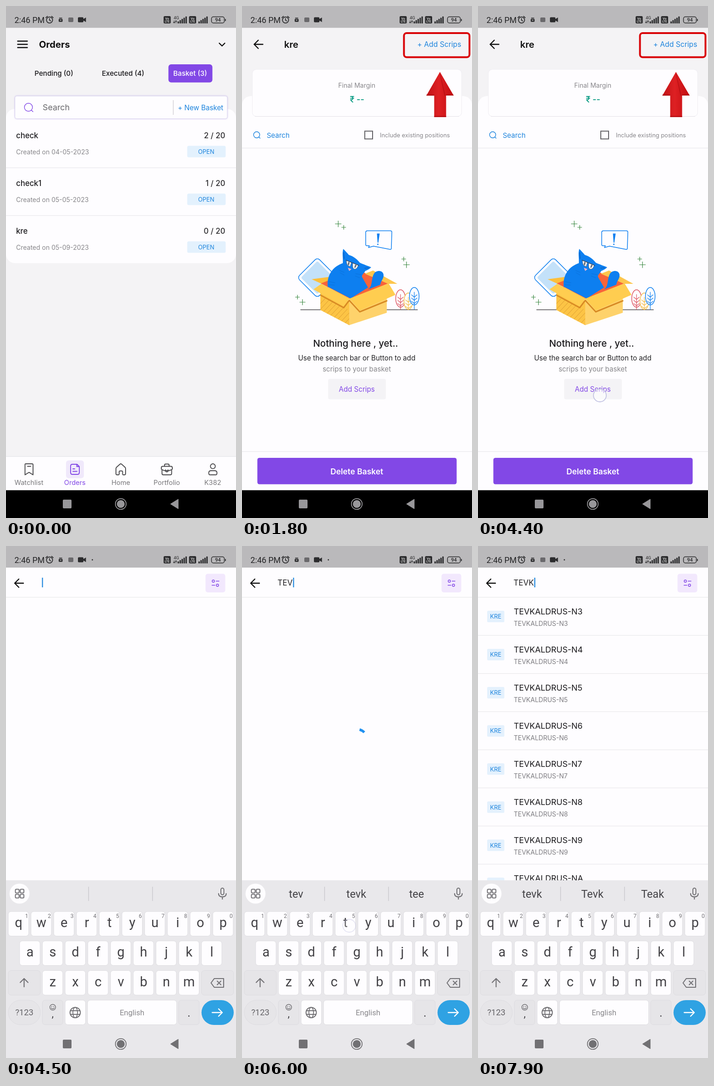
Write an HTML page that moves like this. It is 502 px wide and 1115 px high and loops after 8000 ms.

```html
<!DOCTYPE html>
<html lang="en">
<head>
<meta charset="utf-8">
<title>Add scrips to a basket</title>
<style>
  html, body { margin: 0; width: 100%; height: 100%; overflow: hidden; background: #f4f3f5; }
  svg { display: block; width: 502px; height: 1115px; }
  text { font-family: Inter, Roboto, sans-serif; white-space: pre; }
  .rb { font-family: Roboto, "Open Sans", sans-serif; }
  .ln { fill: none; stroke-linecap: round; stroke-linejoin: round; }
</style>
</head>
<body>
<svg id="stage" viewBox="0 0 502 1115"></svg>
<script>
const PURPLE = '#8248e6', BLUE = '#1d84dd', GREY = '#87868a', PANEL = '#fefdff', BACK = '#f4f3f5';

const rect = (x, y, w, h, fill, r = 0, more = '') =>
  `<rect x="${x}" y="${y}" width="${w}" height="${h}" rx="${r}" fill="${fill}" ${more}/>`;
const line = (d, stroke, w = 1.5, more = '') =>
  `<path class="ln" d="${d}" stroke="${stroke}" stroke-width="${w}" ${more}/>`;
const shape = (d, fill, more = '') => `<path d="${d}" fill="${fill}" ${more}/>`;
const disc = (x, y, r, fill, more = '') => `<circle cx="${x}" cy="${y}" r="${r}" fill="${fill}" ${more}/>`;
const ring = (x, y, r, stroke, w) => disc(x, y, r, 'none', `stroke="${stroke}" stroke-width="${w}"`);
const text = (x, y, size, str, fill, more = '') =>
  `<text x="${x}" y="${y}" font-size="${size}" fill="${fill}" ${more}>${str}</text>`;
const MID = 'text-anchor="middle"', END = 'text-anchor="end"', MED = 'font-weight="500"';
const SEMI = 'font-weight="600"', RB = 'class="rb"';
const group = (id, body) => `<g id="${id}">${body}</g>`;
const rule = (y, color = '#e9e8eb') => rect(0, y, 502, 1.2, color);
const backArrow = (x, y) => line(`M${x + 19} ${y}H${x}m9-9l-9 9 9 9`, '#111', 2.4);
const lens = (x, y, r, color, w) => ring(x, y, r, color, w) +
  line(`M${x + r * .72} ${y + r * .72}l${r * .4} ${r * .4}`, color, w);

function statusBar() {
  const ink = '#2b2b2d';
  const volte = x => rect(x, 22, 15.5, 16, ink, 2.5) +
    text(x + 7.7, 29.5, 7, 'Vo', '#ccc', `${MID} class="rb" font-weight="700"`) +
    text(x + 7.7, 36, 6.5, 'LTE', '#ccc', `${MID} class="rb" font-weight="700"`);
  const bars = x => [0, 1, 2, 3, 4].map(i =>
    rect(x + i * 4.3, 33.5 - i * 2.7, 3, 4.5 + i * 2.7, ink, .8)).join('');
  return rect(0, 0, 502, 47.5, '#bab9bb') + text(18.5, 37, 17.9, '2:46 PM', '#242426', RB) +
    ring(95, 30.5, 6.7, ink, 1.8) + line('M95 27v4l2.5 1.5M87 25.5l3.5-3M103 25.5l-3.5-3', ink, 1.7) +
    rect(115, 28, 8.5, 6.5, ink, 1.5) + rect(116, 25.5, 6.5, 1.6, ink) + rect(117.5, 30, 3.5, 1.6, '#bbb') +
    rect(136, 25, 11, 10, '#6a696c', 2) +
    rect(157, 24.5, 12, 11, ink, 2) + shape('M168 29l6.5-4v10l-6.5-4z', ink) +
    volte(344) + text(366, 28.5, 9.5, '4G', ink, RB) +
    line('M367 32v5m-1.5-1.5l1.5 1.5 1.5-1.5M371 37v-5m-1.5 1.5l1.5-1.5 1.5 1.5', ink, 1.1) +
    bars(374.5) + volte(399.5) + bars(420) +
    rect(448.5, 23.5, 28, 13.5, 'none', 4, `stroke="${ink}" stroke-width="1.5"`) + rect(478, 28, 1.8, 5, ink, 1) +
    text(462.5, 34.3, 11, '94', ink, `${MID} class="rb" font-weight="500"`);
}

const navKeys = (back, ink) => rect(0, 1054.5, 502, 60.5, back) + rect(124, 1075, 19, 19, ink, 2) +
  ring(250.5, 1084.5, 11.7, ink, 1.8) + disc(250.5, 1084.5, 8.6, ink) +
  shape('M359 1084.5L376 1074v21z', ink, `stroke="${ink}" stroke-linejoin="round"`);

function ordersPage() {
  const row = ([name, date, n], i) => {
    const y = 104 * i;
    return text(22, 288 + y, 16.7, name, '#1c1b1e', MED) + text(478.5, 288 + y, 16.7, n + ' / 20', '#2c2b2e', `${END} ${MED}`) +
      text(22, 322.5 + y, 14, 'Created on ' + date, GREY) + rect(395.5, 304.5 + y, 84, 25, '#e3f1fd', 3.5) +
      text(437, 322 + y, 12.9, 'OPEN', BLUE, MID) + (i < 2 ? rule(351.7 + y) : '');
  };
  const ink = '#4a494c';
  const icons = [
    'M41.5 998q0-1 1.5-1H57q2 0 2 2v22l-8.7-5.5-8.8 5.5zM47 1002.5h7',
    'M155 998h-10q-4 0-4 4v14q0 4 4 4h11q4 0 4-4v-13zM154.500 998v5h5.500M146 1008h4m-4 5.500h9',
    'M240 1007.500q0-2 1.500-3.300l7-6.200q2-1.800 4 0l7 6.200q1.500 1.300 1.500 3.300v11q0 2.500-2.500 2.500h-2.500q-1.500 0-1.500-1.500v-5q0-2-2-2h-3.500q-2 0-2 2v5q0 1.500-1.500 1.500h-3q-2.500 0-2.500-2.500z',
    'M342 1002.500h18q3 0 3 3v3q-5 3.500-9 3.500h-6q-4 0-9-3.500v-3q0-3 3-3zM346 1002v-2q0-2.500 2.500-2.500h5q2.500 0 2.500 2.500v2M340.500 1010v8q0 3 3 3h15q3 0 3-3v-8M348.500 1010v3q0 1.500 2.500 1.500t2.500-1.500v-3',
    'M451.500 997a5.300 5.300 0 0 1 0 10.600 5.300 5.300 0 0 1 0-10.600M442.500 1017q0-5 5-5h8q5 0 5 5t-5 4h-8q-5 1-5-4'
  ];
  const labels = ['Watchlist', 'Orders', 'Home', 'Portfolio', 'K382'];
  const tab = (d, i) => line(d, i == 1 ? PURPLE : ink, 1.9) +
    text(50 + 100.3 * i, 1043, 14.6, labels[i], i == 1 ? PURPLE : '#79787b', MID);
  return rect(0, 47, 502, 1010, BACK) +
    line('M25.500 76.500h21m-21 7h21m-21 7h21', '#111', 2.5) + text(72, 91, 20.2, 'Orders', '#111', 'font-weight="700"') +
    line('M465.500 81l6 6 6-6', '#111', 2.4) +
    text(104.5, 152, 15.2, 'Pending (0)', '#19181b', `${MID} ${MED}`) +
    text(255.5, 152, 15.2, 'Executed (4)', '#19181b', `${MID} ${MED}`) +
    rect(354.5, 127, 96, 39.5, PURPLE, 6) + text(402, 152, 15.2, 'Basket (3)', '#fff', `${MID} ${MED}`) +
    rect(0, 224, 502, 336, PANEL, 20) +
    rect(19.5, 196, 463.5, 49.5, PANEL, 4, 'stroke="#d9d2ee" filter="url(#soft)"') +
    lens(49, 220.5, 8.8, PURPLE, 1.4) + text(80, 227, 17.8, 'Search', '#69686c') +
    rect(364.5, 205, 1.2, 32, '#c9c8cd') + text(375, 226.5, 15.2, '+ New Basket', BLUE) +
    [['check', '04-05-2023', 2], ['check1', '05-05-2023', 1], ['kre', '05-09-2023', 0]].map(row).join('') +
    rect(0, 981, 502, 75, PANEL) + rule(980.5, '#e6e5e8') + rect(131, 989.5, 39, 39, '#f0e9fb', 6) +
    icons.map(tab).join('') + navKeys('#000', '#98979a');
}

function catArt() {
  const ink = '#0d7ff0';
  const spark = (x, y, r) => line(`M${x - r} ${y}h${2 * r}M${x} ${y - r}v${2 * r}`, '#37873f', 1.2);
  const tree = (x, y, rx, ry, c) => `<ellipse cx="${x}" cy="${y}" rx="${rx}" ry="${ry}" fill="${PANEL}" stroke="${c}" stroke-width="1.5"/>` +
    line(`M${x} ${y - 9}V661M${x - 6} ${y - 3}l6 5 6-5m-12 7l6 5 6-5m-12 7l6 5 6-5`, c, 1.2);
  let hatch = '';
  for (let i = 0; i < 13; i++) hatch += `M${160 + i * 7} ${660 + i * 5}l28-30`;
  return `<g transform="rotate(45 164.500 591.500)">` +
    rect(133.5, 560.5, 62, 62, PANEL, 7, `stroke="${ink}" stroke-width="1.5"`) + rect(139, 566, 51, 51, '#c3e1f9', 4) + '</g>' +
    line('M128 661.500H383', '#4b4a4e', 1.4) +
    tree(346, 637, 10.5, 19, '#dd5460') + tree(363, 643, 9.5, 18, '#f5bd47') + tree(376, 632, 10.5, 19, ink) +
    shape('M152 595l38-5 26 12-40 4z', '#fdbf3a') + shape('M172 604l80-30 68 30-84 34z', '#f8643a') +
    shape('M268 583l18-7 53 29-20 0z', '#fdc64d') +
    shape('M187 611c-2-24 10-43 33-51 1-11-2-20 1-31 5 5 9 9 12 13 10 3 18 9 24 17 9 4 15 6 25 10-4 4-8 6-13 8-3 6-8 8-7 13l13 23-38 24z', ink) +
    shape('M273 618c13-5 8-23 15-35 6-9 22-8 21 5-1 8-6 10-7 19z', ink) +
    line('M222 537l1 13M276 570l-8 1', '#0a5fbd', 1.5) +
    shape('M228 554l11 4.500-3 9q-9-2-8-13.500zM242 559.500l12 5q-4 11-10 8-4-3-2-13z', '#f4f6f8', 'stroke="#4b5568" stroke-width=".8"') +
    shape('M232 557l3 1.200-1.500 7-3-2zM247 563l3.500 1.500-3.500 6-2-1z', '#66707f') +
    line('M227 553.500l28 11.500', '#343c4c', 1.2) +
    shape('M231 570l8 3-5 4z', '#f7b5cb') +
    line('M190 600l13 3m-14 4l13 1M213 576l10 4m-9 1l9 5M248 583l12 2m-13 3l10 4', '#0a6fd6', .8) +
    shape('M171 623l63 20v52l-63-33z', '#fcc445') + shape('M234 638l82-10v40l-82 27z', '#fed26b') +
    `<clipPath id="side"><path d="M171 631l51 26 12-16v54l-63-33z"/></clipPath>` +
    line(hatch, '#dc9b32', 1, 'clip-path="url(#side)"') +
    line('M172 630l50 27 12-16 23 25 59-24', '#d88a24', 3) +
    shape('M173 605l62 32-13 17-66-37z', '#ffcd50') + shape('M235 637l85-33 15 25-78 34z', '#ffcd50') +
    line('M273 489.500h51q3 0 3 3l-1 35q0 3-3 2.500l-36-7-11 3 2-4-6 0q-2 0-2-3v-26q0-3 3-3.500z', ink, 1.5) +
    shape('M294.500 495.500l6 0-3 20-1.500 0z', ink) + disc(296.5, 519, 1.5, ink) +
    spark(210, 474.5, 6.5) + spark(222, 482, 4.5) + spark(353, 551, 4.5) + spark(359, 563.5, 6.5) +
    spark(121, 634, 4.5) + spark(132, 645, 6);
}

function basketPage() {
  return rect(0, 47, 502, 1010, BACK) + rect(0, 196, 502, 860, PANEL, 20) + rect(0, 230, 502, 826, PANEL) +
    backArrow(26.5, 83.5) + text(92, 91, 20.2, 'kre', '#111', SEMI) +
    text(478.5, 89, 15.7, '+ Add Scrips', BLUE, END) +
    rect(22.5, 138, 457, 102.5, PANEL, 9, 'stroke="#efedf2"') + line('M29 240.500H473', '#e3e1e7', 1.2) +
    text(250.5, 178, 14, 'Final Margin', GREY, MID) + text(251, 209.5, 18.2, '₹ --', '#17a08a', `${MID} ${SEMI}`) +
    lens(32, 280.5, 6.7, BLUE, 1.4) + text(54, 287, 15, 'Search', BLUE) +
    rect(268, 272.5, 17, 17, 'none', 0, 'stroke="#626165" stroke-width="2"') +
    text(301, 286, 12.8, 'Include existing positions', GREY) + rule(308.8) +
    catArt() + text(248, 742, 20.4, 'Nothing here , yet..', '#19181b', `${MID} ${MED}`) +
    text(250.5, 771.5, 15.2, 'Use the search bar or Button to add', '#222124', MID) +
    text(250.5, 796, 15.1, 'scrips to your basket', GREY, MID) +
    rect(188, 812, 126, 44.5, '#f4f3f6', 4) + text(250.5, 840, 15.2, 'Add Scrips', PURPLE, MID) +
    rule(969.7) + rect(33.5, 984, 435, 57.5, PURPLE, 4.5) + text(250.5, 1019.5, 17.4, 'Delete Basket', '#fff', `${MID} ${SEMI}`) +
    navKeys('#000', '#98979a') +
    rect(353.5, 59, 143, 52.5, 'none', 6, 'stroke="#d90408" stroke-width="4"') +
    shape('M432 143.500L462 195H445.500V242H419.500V195H402.500z', 'url(#red)') +
    shape('M432 144l12 51-2 1-10-46zM402.500 192.500h17v3h-17zM445 192.500h16l1 2.500h-17zM419.500 239h26v3h-26z', '#a80c10', 'opacity=".55"');
}

function keyboard() {
  const ink = '#434246', soft = '#727175', step = 49.6;
  const key = (x, y, w, fill = PANEL, r = 6) => rect(x, y, w, 53.5, fill, r, 'stroke="#dcdbdf" stroke-width=".9"');
  const letters = (str, x0, y, hints = '') => [...str].map((c, i) => {
    const x = x0 + i * step;
    return key(x, y, 44.5) + text(x + 22.5, y + 34, 29, c, ink, `${MID} ${RB}`) +
      (hints ? text(x + 40, y + 13.5, 12, hints[i], soft, `${MID} ${RB}`) : '');
  }).join('');
  const grid = [[20.5, 747.5], [31, 747.5], [20.5, 758.5], [31, 758.5]]
    .map(([x, y]) => rect(x, y, 8, 8, 'none', 2, `stroke="${soft}" stroke-width="2"`)).join('');
  const dark = '#e6e5e8';
  return rect(0, 728, 502, 387, '#e9e8eb') + disc(29.5, 757, 21.8, PANEL) + grid +
    rect(179.7, 742, 1.2, 31, '#c4c3c8') + rect(319.2, 742, 1.2, 31, '#c4c3c8') +
    rect(469, 745, 6.6, 14.5, 'none', 3.3, `stroke="${soft}" stroke-width="2"`) +
    line('M464 757q0 7 8.300 7t8.300-7M472.300 764v5', soft, 2.2) +
    letters('qwertyuiop', 5, 796, '1234567890') + letters('asdfghjkl', 29.8, 860) + letters('zxcvbnm', 79.4, 924.5) +
    key(5, 924.5, 70, dark) + line('M39.500 960v-18m-8.500 8.500l8.500-8.500 8.500 8.500', soft, 2.2) +
    key(426.7, 924.5, 70, dark) + line('M447.500 951.500l7-9.500H475v19H454.500zM461 947.500l8 8m0-8l-8 8', soft, 2.1) +
    key(5, 989, 70, dark, 26.7) + text(40, 1022, 18.4, '?123', '#656468', `${MID} ${RB}`) +
    key(79.4, 989, 45, dark) + ring(102, 1004.5, 6.3, soft, 1.5) + disc(99.7, 1003, 1, soft) + disc(104.3, 1003, 1, soft) +
    line('M98.500 1006q3.500 4 7 0', soft, 1.3) + text(102, 1026, 22, ',', ink, `${MID} ${RB}`) +
    key(129, 989, 44.5) + ring(151, 1016, 11.3, soft, 2) +
    `<ellipse cx="151" cy="1016" rx="5" ry="11.300" fill="none" stroke="${soft}" stroke-width="1.800"/>` +
    line('M141 1012h20m-20 8h20', soft, 1.8) +
    key(178, 989, 194.5) + text(275, 1021.5, 16.6, 'English', GREY, `${MID} ${RB}`) +
    key(376.8, 989, 45, dark) + text(399.3, 1025, 25, '.', ink, `${MID} ${RB}`) +
    rect(426.7, 989, 70.3, 54, '#2fa2e3', 27) + line('M450 1016h22m-8-8l8 8-8 8', '#fff', 2.3) +
    navKeys('#e9e8eb', '#717073');
}

function searchPage() {
  const row = (c, i) => {
    const y = 83.05 * i, name = 'TEVKALDRUS-N' + c;
    return rect(20, 141 + y, 37.5, 25, '#e4f1fd', 2.5) + text(38.7, 158.3 + y, 13, 'KRE', BLUE, MID) +
      text(78, 149 + y, 17.8, name, '#19181b') + text(78, 174 + y, 14, name, '#7d7c80') + rule(194 + y);
  };
  return rect(0, 47, 502, 690, PANEL) + disc(188.5, 30, 1.5, '#333') +
    backArrow(19, 81) + text(77.5, 86, 17, '', '#222124', 'id="typed"') +
    rect(0, 69, 2.2, 21, '#2087dd', 0, 'id="caret"') +
    rect(435.5, 60.5, 43, 40.5, '#f2e8fd', 5) + ring(452.5, 76.5, 2.5, PURPLE, 1.4) + ring(461.5, 85.5, 2.5, PURPLE, 1.4) +
    line('M458.500 76.500h6.500M449.500 85.500h6.500', PURPLE, 1.4) + rule(111) +
    group('list', [...'3456789A'].map(row).join('')) +
    '<path id="spin" fill="none" stroke="#2191f0" stroke-width="5.500"/>' + keyboard() +
    [118, 249.5, 381].map((x, i) => text(x, 765.5, 23.6, '', '#444347', `id="hint${i}" ${MID} ${RB}`)).join('');
}

const stage = document.getElementById('stage');
stage.innerHTML = `<defs>
  <filter id="soft" x="-5%" y="-30%" width="110%" height="160%"><feDropShadow dx="0" dy="0" stdDeviation="1.600" flood-color="#8a6fd6" flood-opacity=".4"/></filter>
  <linearGradient id="red"><stop offset="0" stop-color="#c01317"/><stop offset=".45" stop-color="#de2023"/><stop offset="1" stop-color="#c20c10"/></linearGradient>
  </defs>` + group('orders', ordersPage()) + group('basket', basketPage()) + statusBar() + group('search', searchPage()) +
  disc(0, 0, 14, '#fff', 'id="touch" fill-opacity=".55" stroke="#c3c3e3" stroke-width="1.800"');

const el = id => document.getElementById(id);
const show = (id, on) => el(id).setAttribute('display', on ? 'inline' : 'none');
const put = (id, str) => { if (el(id).textContent !== str) el(id).textContent = str; };

// start time, typed text, suggestions
const typing = [
  [4500, '', '', '', ''],
  [4800, 'T', 't', 'thanks', 'the'],
  [5100, 'TE', 'te', 'tea', 'ten'],
  [5900, 'TEV', 'tev', 'tevk', 'tee'],
  [6700, 'TEVK', 'tevk', 'Tevk', 'Teak']
];
// press, hold end, gone, x, y
const touches = [
  [1300, 1450, 1700, 262, 525],
  [4300, 4450, 4500, 266, 848],
  [4700, 4800, 4950, 230, 826],
  [4950, 5050, 5250, 75, 900],
  [5800, 5880, 6080, 234, 827],
  [6600, 6700, 6900, 66, 896]
];
const loads = [[5900, 6300], [6800, 7100]];

function spinPath(s) {
  const turn = 1333, p = s % turn;
  const from = -90 + s * .15 + Math.max(0, p - 667) * .4;
  const sweep = p < 667 ? p * .3 + 2 : 202 - (p - 667) * .3;
  const at = a => `${251 + 21.5 * Math.cos(a * Math.PI / 180)} ${420.5 + 21.5 * Math.sin(a * Math.PI / 180)}`;
  return `M${at(from)}A21.5 21.5 0 ${sweep > 180 ? 1 : 0} 1 ${at(from + sweep)}`;
}

function draw(t) {
  show('orders', t < 1800);
  show('basket', t >= 1800 && t < 4500);
  show('search', t >= 4500);

  const touch = touches.find(([a, , c]) => t >= a && t < c);
  show('touch', touch);
  if (touch) {
    const [, hold, gone, x, y] = touch;
    el('touch').setAttribute('transform', `translate(${x} ${y})`);
    el('touch').setAttribute('opacity', t < hold ? 1 : (gone - t) / (gone - hold));
  }
  if (t < 4500) return;

  const [since, typed, ...hints] = typing.filter(k => k[0] <= t).pop();
  put('typed', typed);
  hints.forEach((h, i) => put('hint' + i, h));
  el('caret').setAttribute('x', 78.5 + (typed ? el('typed').getComputedTextLength() : 0));
  show('caret', Math.floor((t - since) / 500) % 2 === 0);

  const load = loads.find(([a, b]) => t >= a && t < b);
  show('spin', load);
  if (load) el('spin').setAttribute('d', spinPath(t - load[0]));
  show('list', t >= 6300 && !load);
}

const began = performance.now();
function tick() {
  draw((performance.now() - began) % 8000);
  requestAnimationFrame(tick);
}
tick();
</script>
</body>
</html>
```
